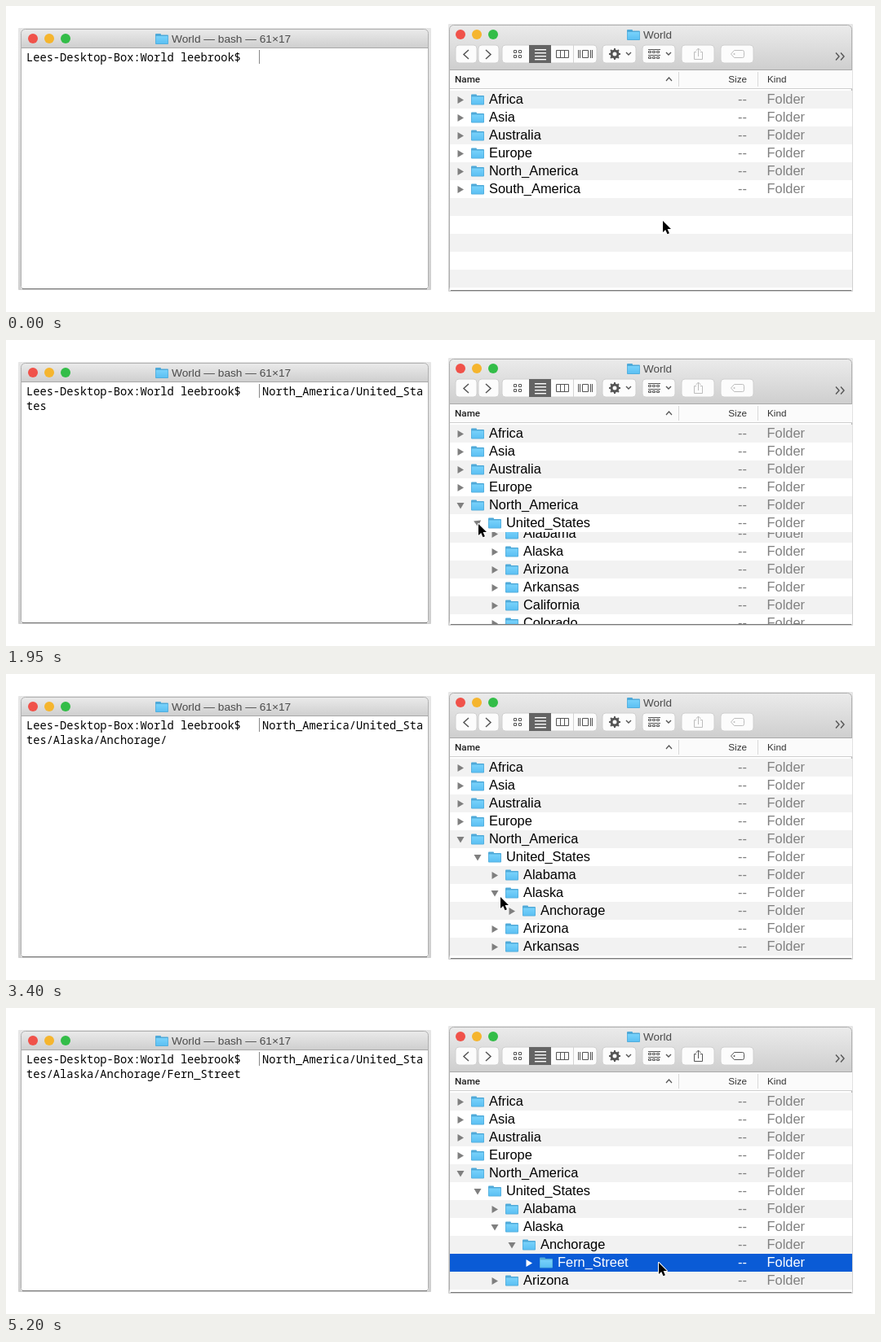
These frames come from a looping animation (1065x376 px, 5.25 s). An HTML page with a canvas:

```html
<!DOCTYPE html>
<html lang="en">
<head>
<meta charset="utf-8">
<title>Typing a path by opening folders</title>
<style>
html, body { margin: 0; width: 100%; height: 100%; overflow: hidden; background: #fff; }
canvas { display: block; }
</style>
</head>
<body>
<canvas id="stage" width="1065" height="376"></canvas>
<script>
const c = document.getElementById('stage').getContext('2d');
const LOOP = 5250, STEP = 50, SLIDE = 250, SETTLE = 320;
const ROW = 22, LIST_TOP = 104, LIST_BOTTOM = 350;
const SANS = '"Liberation Sans", Arial, sans-serif';
const MONO = '500 13.7px "Noto Sans Mono", monospace';
const PROMPT = 'Lees-Desktop-Box:World leebrook$';
const STREET = 'Fern_Street';
const PATH = 'North_America/United_States/Alaska/Anchorage/' + STREET;

// Bursts of typing: start time, characters already there, characters to add
const BURSTS = [[650, 0, 28], [2300, 28, 7], [2950, 35, 10], [3900, 45, 11]];
// Pointer legs: start, end, x, y
const START = [805, 264];
const LEGS = [[100, 800, 556, 201], [1150, 1600, 579, 226],
  [2300, 2800, 599, 266], [3300, 3550, 619, 289], [4150, 4850, 800, 313]];

const leaf = name => ({ name });
const parent = (name, openAt, children) => ({ name, openAt, children });
const TREE = [
  ...['Africa', 'Asia', 'Australia', 'Europe'].map(leaf),
  parent('North_America', 1050, [
    parent('United_States', 1740, [
      leaf('Alabama'),
      parent('Alaska', 2905, [parent('Anchorage', 3735, [leaf(STREET)])]),
      ...['Arizona', 'Arkansas', 'California', 'Colorado'].map(leaf)
    ])
  ]),
  leaf('South_America')
];

const ease = (t, from, to) => {
  const p = Math.min(1, Math.max(0, (t - from) / (to - from)));
  return p * p * (3 - 2 * p);
};
const openness = (node, t) => node.children ? ease(t, node.openAt, node.openAt + SLIDE) : 0;
const heightOf = (nodes, t) => nodes.reduce((h, n) =>
  h + ROW + (n.children ? openness(n, t) * heightOf(n.children, t) : 0), 0);

function text(s, x, y, font, color = '#000', align = 'left') {
  c.font = font;
  c.fillStyle = color;
  c.textAlign = align;
  c.fillText(s, x, y);
}
function rect(x, y, w, h, color) {
  c.fillStyle = color;
  c.fillRect(x, y, w, h);
}
function round(x, y, w, h, r, fill, stroke) {
  c.beginPath();
  c.roundRect(x, y, w, h, r);
  if (fill) { c.fillStyle = fill; c.fill(); }
  if (stroke) { c.strokeStyle = stroke; c.lineWidth = 1; c.stroke(); }
}
function line(d, color, width = 1) {
  c.strokeStyle = color;
  c.lineWidth = width;
  c.stroke(new Path2D(d));
}
function shape(d, color) {
  c.fillStyle = color;
  c.fill(new Path2D(d));
}
function gradient(y0, y1, top, bottom) {
  const g = c.createLinearGradient(0, y0, 0, y1);
  g.addColorStop(0, top);
  g.addColorStop(1, bottom);
  return g;
}
function folder(x, y) {
  round(x, y, 7, 4, 1, '#4fa9d8');
  round(x, y + 1.5, 16, 11.5, 1, '#4fa9d8');
  rect(x + .7, y + 3, 14.6, 9.2, gradient(y + 3, y + 12, '#78d2fb', '#5cc0f3'));
}
function trafficLights(x, y) {
  ['#f0524a', '#f5b52e', '#33bd48'].forEach((color, i) => {
    c.beginPath();
    c.arc(x + 20 * i, y, 6, 0, 7);
    c.fillStyle = color;
    c.fill();
  });
}
function frame(x, y, w, h, barHeight, margin) {
  round(x - margin, y - 1, w + 2 * margin, h + 2, 1, gradient(y, y + h, '#e6e6e6', '#d0d0d0'));
  round(x, y, w, h, [5, 5, 3, 3], '#fff');
  round(x, y, w, barHeight, [5, 5, 0, 0], gradient(y, y + barHeight, '#ebebeb', '#cfcfcf'));
  round(x + .5, y + .5, w - 1, h - 1, [5, 5, 3, 3], null, '#b0b0b0');
  rect(x + 1, y + barHeight, w - 2, 1, '#a9a9a9');
  rect(x + 2, y + h - 1, w - 4, 1, '#777');
}

function terminal(t) {
  frame(18, 28, 500, 320, 23, 3);
  trafficLights(33, 40);
  folder(183, 34);
  text('World — bash — 61×17', 203, 45, '13.7px ' + SANS, '#4b4b4b');
  text(PROMPT, 25, 68, MONO);
  if (t < 400 || t >= 650) rect(310, 54, 1, 17, '#888');
  let count = 0;
  for (const [start, before, add] of BURSTS)
    if (t >= start) count = before + Math.min(add, Math.floor((t - start) / STEP) + 1);
  const typed = PATH.slice(0, count);
  text(typed.slice(0, 24), 314, 68, MONO);
  text(typed.slice(24), 25, 86, MONO);
}

function toolbar(t) {
  const ink = '#555';
  const button = (x, w) => round(x, 48, w, 22, 4, '#fcfcfc', '#d0d0d0');
  [[551, 26], [579, 25], [608, 116], [731, 41], [780, 40], [828, 40], [876, 40]]
    .forEach(b => button(...b));
  line('M567 54l-6 5.5 6 5.5M588 54l6 5.5-6 5.5', ink, 1.5);
  rect(641, 48, 27, 22, '#646464');
  rect(695, 48, 1, 22, '#d4d4d4');
  for (let i = 0; i < 4; i++) {
    round(622.5 + i % 2 * 6, 54.5 + (i >> 1) * 6, 3, 3, 0, null, ink);
    rect(648, 53 + 4 * i, 14, 1.4, '#fff');
  }
  line('M674.5 54.5h15v9h-15zM679.5 54v10M684.5 54v10', ink);
  line('M701.5 54v10M703.5 54v10M706.5 54.5h7v9h-7zM716.5 54v10M718.5 54v10', ink);

  c.beginPath();
  c.arc(746, 59, 4, 0, 7);
  c.strokeStyle = ink;
  c.lineWidth = 3;
  c.stroke();
  for (let i = 0; i < 8; i++) {
    const a = i * Math.PI / 4, x = Math.cos(a), y = Math.sin(a);
    line(`M${746 + 4 * x} ${59 + 4 * y}L${746 + 7 * x} ${59 + 7 * y}`, ink, 2);
  }
  line('M760 57l3 3 3-3M809 57l3 3 3-3', ink, 1.4);
  for (let y = 53; y < 66; y += 7) {
    rect(787, y, 15, 1, ink);
    for (let x = 0; x < 3; x++) round(787.5 + 5 * x, y + 2.5, 3, 2, 0, null, ink);
  }
  const late = t >= 5200 ? '#555' : '#bdbdbd';
  line('M846 56.5h-2.5v9h10v-9h-2.5M848.5 62v-10M845.5 55l3-3 3 3', late);
  line('M888.5 59l4-4.5h10q2 0 2 2v5q0 2-2 2h-10z', late);
  round(891.5, 58, 2, 2, 1, late);
  line('M1017 57.5l4 4.5-4 4.5M1023 57.5l4 4.5-4 4.5', ink, 1.4);
}

function triangle(x, y, turn, color) {
  c.save();
  c.translate(x, y);
  c.rotate(turn * Math.PI / 2);
  shape('M-3.5-4.5L4 0-3.5 4.5z', color);
  c.restore();
}

function row(node, depth, y, index, t) {
  const x = 21 * depth, selected = node.name === STREET && t >= 5050;
  const soft = selected ? '#fff' : '#808080', font = '16.4px ' + SANS;
  rect(544, y, 493, ROW, selected ? '#0a5bd6' : index % 2 ? '#fff' : '#f2f2f2');
  triangle(557 + x, y + 11.5, openness(node, t), selected ? '#fff' : '#7f7f7f');
  folder(570 + x, y + 4.5);
  text(node.name, 592 + x, y + 16, font, selected ? '#fff' : '#000');
  text('--', 908, y + 16, font, soft, 'right');
  text('Folder', 932.5, y + 16, font, soft);
}

// Children slide out from under their parent. Rows below keep their stripe
// colour until the slide has settled. Returns the next stripe index.
function rows(nodes, depth, y, index, t) {
  for (const node of nodes) {
    row(node, depth, y, index++, t);
    y += ROW;
    const p = openness(node, t);
    if (p > 0) {
      const full = heightOf(node.children, t);
      c.save();
      c.beginPath();
      c.rect(544, y, 493, full * p);
      c.clip();
      const next = rows(node.children, depth + 1, y - full * (1 - p), index, t);
      c.restore();
      y += full * p;
      if (t >= node.openAt + SETTLE) index = next;
    }
  }
  return index;
}

function browser(t) {
  frame(543, 23, 494, 327, 55, 1);
  trafficLights(557, 35);
  folder(761, 29);
  text('World', 781, 40, '13.5px ' + SANS, '#4b4b4b');
  toolbar(t);

  rect(544, 79, 493, 22, '#fbfbfb');
  rect(544, 101, 493, 1, '#cfcfcf');
  rect(824, 81, 1, 18, '#d9d9d9');
  rect(921, 81, 1, 18, '#d9d9d9');
  text('Name', 550, 94, '500 11.7px Roboto, sans-serif', '#222');
  text('Size', 908, 94, '11.7px ' + SANS, '#333', 'right');
  text('Kind', 933, 94, '11.7px ' + SANS, '#333');
  line('M809 92l3.5-4 3.5 4', '#555', 1.2);

  c.save();
  c.beginPath();
  c.rect(544, 102, 493, LIST_BOTTOM - 103);
  c.clip();
  for (let i = 0; i < 12; i++)
    rect(544, LIST_TOP + ROW * i, 493, ROW, i % 2 ? '#fff' : '#f2f2f2');
  rows(TREE, 0, LIST_TOP, 0, t);
  c.restore();
  rect(545, LIST_BOTTOM - 1, 491, 1, '#777');
}

function pointer(t) {
  let [x, y] = START;
  for (const [from, to, toX, toY] of LEGS) {
    const p = ease(t, from, to);
    x += (toX - x) * p;
    y += (toY - y) * p;
  }
  c.save();
  c.translate(Math.round(x), Math.round(y));
  const arrow = 'M0 0v14l3.2-3 2.3 5.2 2.4-1-2.3-5.1h4.4z';
  c.lineJoin = 'round';
  line(arrow, '#fff', 2);
  shape(arrow, '#000');
  c.restore();
}

function draw() {
  const t = Math.floor(performance.now() % LOOP / STEP) * STEP;
  rect(0, 0, 1065, 376, '#fff');
  terminal(t);
  browser(t);
  pointer(t);
  requestAnimationFrame(draw);
}
draw();
</script>
</body>
</html>
```
